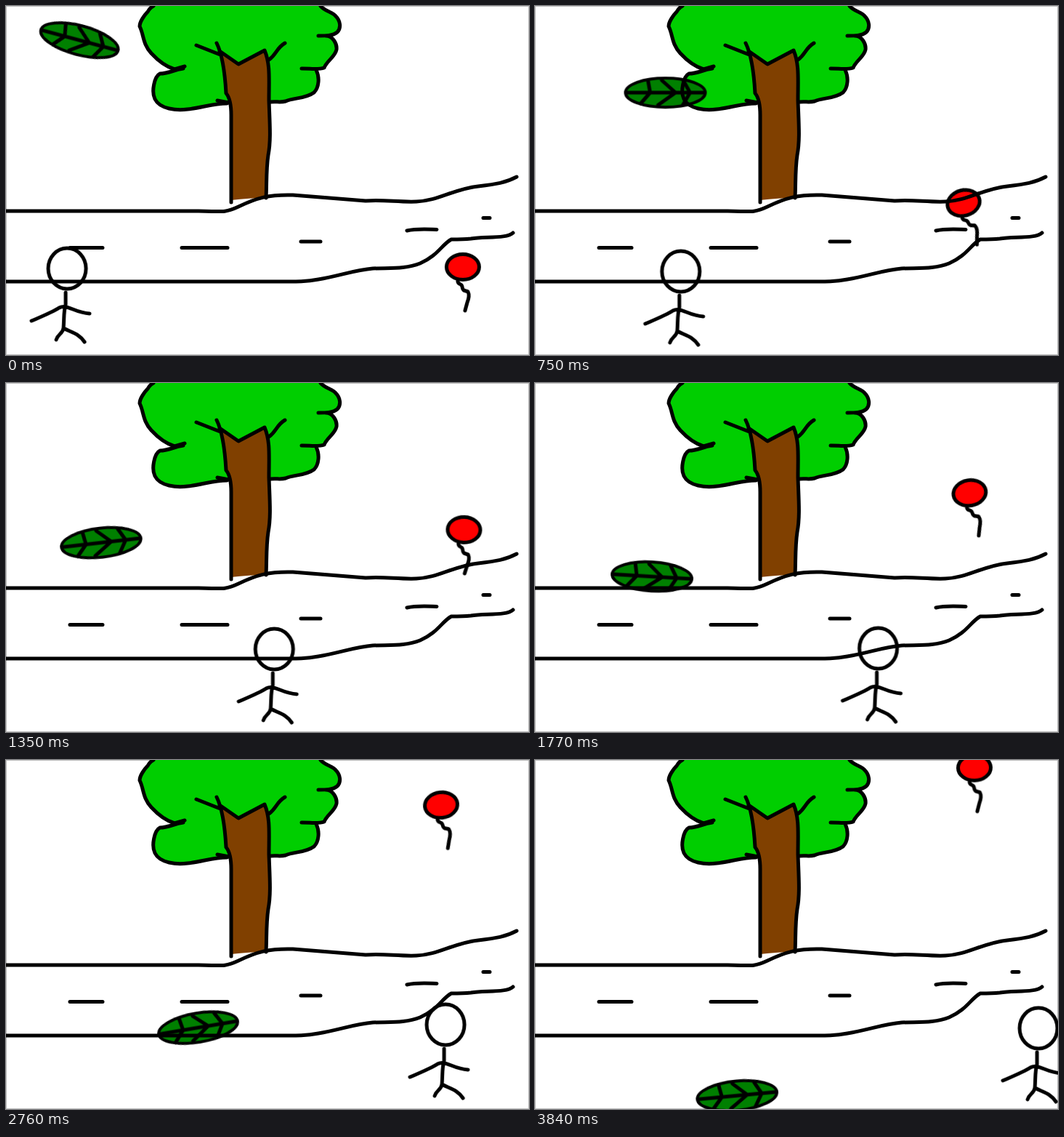
Write an HTML page without scripts that moves like this. It is 720 px wide and 480 px high and loops after 3.87 s.

```html
<!DOCTYPE html>
<html lang="en">
<head>
<meta charset="utf-8">
<title>A walk by the road</title>
<style>
html, body { margin: 0; width: 100%; height: 100%; overflow: hidden; background: #fff; }
svg { display: block; width: 720px; height: 480px; }
.ink { fill: none; stroke: #000; stroke-width: 5; stroke-linecap: round; stroke-linejoin: round; }
.leaf, .balloon, .walker { animation: 3.87s linear infinite; }
.thin { stroke-width: 4; }

/* transform carries sway and tilt, translate carries the height */
.leaf { animation-name: leaf-sway, leaf-fall; }
.balloon { animation-name: balloon-sway, balloon-rise; }
.walker { animation-name: walk; }

@keyframes leaf-sway {
  0% { transform: translate(101px) rotate(15deg); animation-timing-function: cubic-bezier(.33, .5, .67, 1); }
  19.38% { transform: translate(179.5px) rotate(0deg); animation-timing-function: cubic-bezier(.33, 0, .67, 1); }
  34.88% { transform: translate(131px) rotate(-6.5deg); animation-timing-function: cubic-bezier(.33, 0, .67, .68); }
  57.36% { transform: translate(214.5px) rotate(21deg); animation-timing-function: cubic-bezier(.33, .34, .67, .77); }
  71.32% { transform: translate(264.5px) rotate(-9.5deg); animation-timing-function: cubic-bezier(.33, .66, .67, 1); }
  86.82% { transform: translate(283.5px) rotate(-14.5deg); animation-timing-function: cubic-bezier(.33, 0, .67, .8); }
  100% { transform: translate(278px) rotate(-5deg); }
}
@keyframes leaf-fall {
  0% { translate: 0 47px; }
  19.38% { translate: 0 119px; }
  34.88% { translate: 0 219.5px; }
  57.36% { translate: 0 316px; }
  71.32% { translate: 0 368px; }
  86.82% { translate: 0 422px; }
  100% { translate: 0 464px; }
}
@keyframes balloon-sway {
  0% { transform: translate(629px) rotate(0deg); animation-timing-function: cubic-bezier(.33, .5, .67, 1); }
  19.38% { transform: translate(590px) rotate(-15deg); animation-timing-function: cubic-bezier(.33, 0, .67, 1); }
  34.88% { transform: translate(630.5px) rotate(2deg); animation-timing-function: cubic-bezier(.33, 0, .67, 1); }
  57.36% { transform: translate(563px) rotate(-21.5deg); animation-timing-function: cubic-bezier(.33, 0, .67, .76); }
  71.32% { transform: translate(599px) rotate(-6deg); animation-timing-function: cubic-bezier(.33, .6, .67, 1); }
  86.82% { transform: translate(615.5px) rotate(1.5deg); animation-timing-function: cubic-bezier(.33, 0, .67, .8); }
  100% { transform: translate(604.5px) rotate(-1deg); }
}
@keyframes balloon-rise {
  0% { translate: 0 359px; }
  19.38% { translate: 0 271px; }
  34.88% { translate: 0 202px; }
  57.36% { translate: 0 97px; }
  71.32% { translate: 0 62px; }
  86.82% { translate: 0 30px; }
  100% { translate: 0 9.5px; }
}
@keyframes walk {
  0% { transform: translate(84px, 361px); animation-timing-function: cubic-bezier(.33, .26, .67, .52); }
  19.38% { transform: translate(200.5px, 365px); animation-timing-function: cubic-bezier(.33, .27, .67, .7); }
  34.88% { transform: translate(369px, 366px); animation-timing-function: cubic-bezier(.33, .39, .67, .79); }
  57.36% { transform: translate(557px, 364px); animation-timing-function: cubic-bezier(.33, .52, .67, .68); }
  71.32% { transform: translate(605px, 364px); }
  86.82% { transform: translate(655px, 366px); }
  100% { transform: translate(695.4px, 369px); }
}
</style>
</head>
<body>
<svg viewBox="0 0 720 480">
  <rect x=".5" y=".5" width="719" height="479" fill="#fff" stroke="#c0c0c0"/>

  <path fill="#00ce00" d="M203 0C197 3 198 4 195 8C190 13 184 22 184 28C190 40 188 52 200 65C212 78 222 84 232 87C224 93 218 91 212 93C204 97 200 118 205 128C212 142 235 144 250 142C270 140 285 134 304 134L364 132C372 131 378 133 385 131C395 126 412 128 424 119C431 112 432 98 427 88L438 85C442 75 453 70 455 60C456 52 450 41 440 41C450 41 452 40 456 36C462 30 460 20 454 14C450 8 440 8 433 0Z"/>
  <path fill="#804000" d="M294 62L320 80L356 61C364 80 362 100 362 130C363 160 365 185 361 205C358 225 359 245 358 264Q335 264 310 267V150C309 115 303 125 302 105C301 85 298 72 294 62Z"/>

  <g class="leaf">
    <ellipse class="ink thin" rx="55" ry="20" style="fill:#008000"/>
    <path class="ink" d="M-53 0H53M-24 -17L-21 0L-34 15M-5 -17L14 0L-10 17M25 -16L34 0L24 17"/>
  </g>

  <g class="balloon ink">
    <ellipse rx="22.5" ry="17.5" fill="#f00"/>
    <path d="M-7 20C-6 25 -2 22 -1 27C0 34 3 32 7 34C9 38 8 44 6 49L3 60"/>
  </g>

  <g class="ink">
    <!-- crown -->
    <path d="M203 0C197 3 198 4 195 8C190 13 184 22 184 28C190 40 188 52 200 65C212 78 222 84 232 87L246 83M244 86C230 88 224 93 212 93C204 97 200 118 205 128C212 142 235 144 250 142C270 140 285 134 304 134M291 130L307 133"/>
    <path d="M433 0C440 8 450 8 454 14C460 20 462 30 456 36C450 41 440 41 430 41M440 41C450 41 456 52 455 60C453 70 442 75 438 85C430 88 420 86 407 86M427 88C432 98 431 112 424 119C412 128 395 126 385 131C378 133 372 131 364 132"/>
    <!-- trunk -->
    <path d="M290 51C297 65 301 85 303 120C308 126 310 135 310 150V270M294 62L320 80L356 61C364 80 362 100 362 130C363 160 365 185 361 205C358 225 359 245 358 264M262 54L295 67M384 51C372 58 373 66 362 74"/>
    <!-- road -->
    <path d="M0 282H265C300 283 303 284 320 276C345 264 362 259 395 260L495 268C520 266 540 270 565 269C595 268 615 252 650 248C675 245 688 243 703 235"/>
    <path d="M0 379H365C395 379 410 380 430 376C460 371 480 363 505 361C530 360 550 362 570 354C595 343 600 328 613 321C625 321 630 321 640 320C660 317 690 320 698 312"/>
    <path d="M88 332.5H133M242 332.5H305M406 324H433M552 309C565 306 578 307 593 307.5M657 291.5H666"/>
  </g>

  <g class="walker ink">
    <ellipse rx="26" ry="28"/>
    <path d="M-2 33V50C-5 58 -4 72 -5 82C-6 90 -13 90 -15 98M-49 72C-35 66 -20 60 -11 54C0 48 10 61 31 62M-5 82C6 88 16 89 24 101"/>
  </g>
</svg>
</body>
</html>
```
